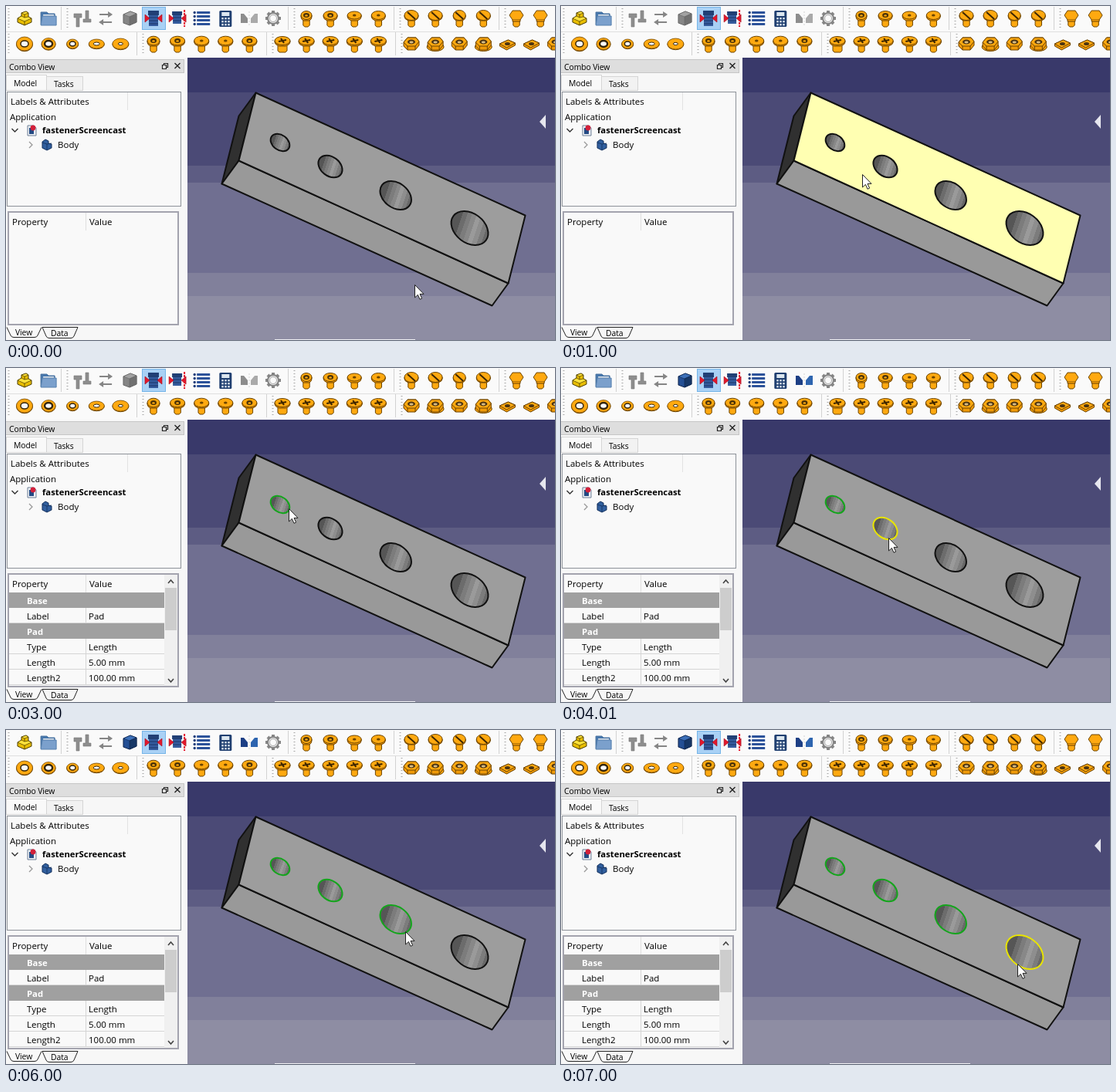
An HTML page that plays this animation: 711x433 px, repeating every 8000 ms.

```html
<!DOCTYPE html>
<html lang="en">
<head>
<meta charset="utf-8">
<title>Selecting holes in a CAD model</title>
<style>
html, body { margin: 0; width: 100%; height: 100%; overflow: hidden; background: #fafafa; }
svg { display: block; width: 711px; height: 433px; }
text { font: 11.5px "Open Sans", "Noto Sans", sans-serif; fill: #000; }
text.small { font-size: 10.4px; letter-spacing: -.1px; }
text.bold { font-size: 11.3px; font-weight: 700; }
</style>
</head>
<body>
<svg id="stage" viewBox="0 0 711 433" xmlns="http://www.w3.org/2000/svg"></svg>
<script>
const LOOP = 8000;
const ORANGE = '#ffa910', SHADE = '#f09a08', BROWN = '#6b4300', BLACK = '#111', PAPER = '#f9f9f9';
const YELLOW = '#e8e400', GREEN = '#14a51c';

const rect = (x, y, w, h, fill, extra = '') =>
  `<rect x="${x}" y="${y}" width="${w}" height="${h}" fill="${fill}" ${extra}/>`;
const path = (d, fill = 'none', stroke = 'none', width = 1, extra = '') =>
  `<path d="${d}" fill="${fill}" stroke="${stroke}" stroke-width="${width}" ${extra}/>`;
const oval = (x, y, rx, ry, fill, stroke = 'none', width = 1) =>
  `<ellipse cx="${x}" cy="${y}" rx="${rx}" ry="${ry}" fill="${fill}" stroke="${stroke}" stroke-width="${width}"/>`;
const text = (x, y, s, cls = '', fill = '#000') =>
  `<text x="${x}" y="${y}" class="${cls}" style="fill:${fill}">${s}</text>`;
const at = (x, y, s) => `<g transform="translate(${x} ${y})">${s}</g>`;
const times = (n, fn) => Array.from({ length: n }, (_, i) => fn(i)).join('');

// Toolbar icons, each drawn around its own centre
const grip = (x, y) => path(`M${x - 7.5} ${y - 15}v30`, 'none', '#d2d2d2') +
  path(`M${x + .5} ${y - 13}v27`, 'none', '#a8a8a8', 2, 'stroke-dasharray="1 3"');

const cube = (top, left, right, edge) =>
  path('M-8-5L1-9L9-6V5L0 9L-8 6Z', left, edge) +
  path('M-8-5L1-9L9-6L0-2Z', top, edge, .6) + path('M0-2L9-6V5L0 9Z', right, edge, .6);

const brick = path('M-9 0L-4-3V-7L2-9L5-7V-2L9 0V5L0 9L-9 5Z', '#e8bd00', '#4a3c00') +
  path('M-9 0L-4-3L0-1L5-2L9 0L0 4Z', '#ffe23c', '#4a3c00', .7) +
  path('M-4-7L2-9L5-7L0-5Z', '#ffe23c', '#4a3c00', .7) +
  path('M0 4V9M0-5V-1', 'none', '#4a3c00', .8);

const folder = path('M-10-8H-2L0-6H8V8H-10Z', '#4878ad', '#456f9d') +
  rect(-7, -5, 14, 3, '#e4e8ed') + path('M-8-3H10V9H-10Z', '#7ba0cc', '#5680ae');

const bolts = path('M-10-6H0V-1H-3V11H-7V-1H-10ZM5-10H9V1H12V5H2V1H5Z', '#8e8e8e', '#777', .6);
const swap = path('M-8-6H3V-9L9-5L3-1V-4H-8ZM8 4H-3V1L-9 5L-3 9V6H8Z', '#858585');

const redArrows = path('M-11-5L-5 0L-11 5ZM11-5L5 0L11 5Z', '#e3172c', '#9a0c1c', .6);
const fit = rect(-7, -10, 14, 6, '#213f75') + rect(-6, -4, 12, 14, '#345b9d') +
  path('M-6-1H6M-6 3H6M-6 7H6', 'none', '#1b3568') + redArrows;
const gauge = rect(-7, -9, 13, 5, '#213f75') + rect(-6, -4, 11, 11, '#345b9d') +
  path('M-6-1H5M-6 3H5', 'none', '#1b3568') + redArrows +
  path('M9-11V11', 'none', '#e3172c', 2, 'stroke-dasharray="3 1"');

const list = times(4, i => oval(-9, -7.5 + i * 5, 1.7, 1.7, '#203f7c') +
  rect(-6, -9 + i * 5, 17, 3, '#2c529a'));
const calculator = rect(-8, -10, 16, 21, '#203f70', 'rx="1.5"') + rect(-5, -8, 10, 5, '#dbe6ef') +
  times(9, i => rect(-5 + i % 3 * 4, -1 + Math.floor(i / 3) * 4, 2.4, 2.4, '#dbe6ef'));
const mirror = (left, right) => path('M-11-6H-7L-2 0V6H-11Z', left) +
  path('M11-6H7L2 0V6H11Z', right) + path('M0-9V10', 'none', '#d4d4d4', 1, 'stroke-dasharray="2 2"');
const gear = path('M0-10V10M-10 0H10M-7-7L7 7M-7 7L7-7', 'none', '#858585', 4) +
  oval(0, 0, 7, 7, '#eee', '#858585', 2) + oval(0, 0, 4.5, 4.5, '#fafafa', '#aaa');

const shank = (w = 4.2) => path(`M${-w} 1V9L${-w + 2} 11H${w - 2}L${w} 9V1Z`, ORANGE, BROWN);
const marks = {
  hex: oval(0, -4, 4, 3, '#4a3208') + oval(0, -3.6, 1.8, 1.2, ORANGE),
  dot: oval(0, -4, 2.3, 1.6, '#6b4400'),
  cross: path('M-5-3L5-5M-2-7L2-1', 'none', '#3d2600', 2.2),
  slot: path('M-5-8L5 1', 'none', '#3d2600', 2)
};
const screw = (mark, rx, ry, width) => shank(width) +
  path(`M${-rx}-4V-2Q${-rx} 1-4 3H4Q${rx} 1 ${rx}-2V-4Z`, SHADE, BROWN) +
  oval(0, -4, rx, ry, ORANGE, BROWN) + marks[mark];
const hexBolt = shank() + path('M-9-4L-5-10H5L9-4L5 2H-5Z', ORANGE, BROWN) +
  path('M-5 2V4H5V2', SHADE, BROWN);
const washer = (rx, ry, hx, hy, edge) =>
  oval(0, .7, rx, ry, SHADE, BROWN) + oval(0, 0, rx, ry, ORANGE, BROWN, .7) +
  oval(0, 0, hx, hy, '#fafafa', '#33250c', edge);
const hexNut = flange => (flange ? oval(0, 4, 11, 5.5, ORANGE, BROWN) : '') +
  path('M-10-2L-5-8H6L10-3V2L5 8H-5L-10 3Z', SHADE, BROWN) +
  path('M-10-2L-5-8H6L10-3L5 3H-5Z', ORANGE, BROWN) +
  path('M-5 3V8M5 3V8', 'none', BROWN) + oval(0, -2.5, 5, 3, '#4c3512') + oval(0, -2, 2.6, 1.4, '#d9bd84');
const squareNut = path('M-10 0L1-5L10-1V2L-1 8L-10 3Z', SHADE, BROWN) +
  path('M-10 0L1-5L10-1L-1 5Z', ORANGE, BROWN) + oval(0, 0, 3.5, 2, '#4c3512');

function toolbar() {
  const row = (y, start, icons) => icons.map((icon, i) => at(start + i * 31.1, y, icon)).join('');
  return rect(0, 0, 711, 67, '#fafafa') + rect(0, 33, 711, 1, '#dedede') +
    rect(176.5, 1.5, 30, 29, '#a9d1f5', 'stroke="#75b5e8"') +
    [3, 79, 373, 510, 646].map(x => grip(x, 16)).join('') +
    [3, 177, 345, 512].map(x => grip(x, 49)).join('') +
    row(16, 24, [brick, folder]) + row(16, 98, [bolts, swap]) +
    `<g id="idle">${at(160, 16, cube('#a2a2a2', '#858585', '#707070', '#666'))}${at(315, 16, mirror('#8d8d8d', '#aaa'))}</g>` +
    `<g id="ready">${at(160, 16, cube('#3d70b8', '#244f94', '#173766', '#0d234b'))}${at(315, 16, mirror('#1d3f85', '#2e65b0'))}</g>` +
    row(16, 191, [fit, gauge, list, calculator]) + at(346, 16, gear) +
    row(16, 389, [screw('hex', 7, 5.5), screw('hex', 9, 5.5), screw('dot', 9, 5), screw('dot', 9, 5.5)]) +
    row(16, 525, [9, 9, 8, 9].map(rx => screw('slot', rx, 6.5))) +
    row(16, 661, [hexBolt, hexBolt]) +
    row(49, 24, [washer(10.5, 9, 5, 4, 1.5), washer(9, 7.5, 5, 4, 2.4), washer(7.5, 6, 3.8, 3, 1.5),
      washer(10, 6, 4, 2, 1), washer(10.5, 7, 3, 1.6, 1)]) +
    row(49, 191, ['hex', 'hex', 'dot', 'dot', 'hex'].map((mark, i) => screw(mark, i ? 9.5 : 8, 5.8))) +
    row(49, 358, [6, 4, 4, 4, 4].map(width => screw('cross', 10, 5.5, width))) +
    row(49, 525, [hexNut(false), hexNut(true), hexNut(false), hexNut(true), squareNut, squareNut, hexNut(false)]);
}

function properties() {
  const group = (y, name) => rect(4, y, 201, 20, '#a0a0a0') + text(27, y + 15, name, 'bold', '#fff');
  const item = (y, name, value) => text(27, y + 15, name) + text(107, y + 15, value) +
    path(`M4 ${y + 19.5}H205M103.5 ${y}v20`, 'none', '#d5d5d5');
  return '<g id="properties">' +
    group(291, 'Base') + item(311, 'Label', 'Pad') + group(331, 'Pad') +
    item(351, 'Type', 'Length') + item(371, 'Length', '5.00 mm') + item(391, 'Length2', '100.00 mm') +
    rect(205, 268, 17, 144, '#f0f0f0') + rect(206, 285, 15, 55, '#cdcdcd') +
    path('M210 279l3.5-4l3.5 4M210 403l3.5 4l3.5-4', 'none', '#444', 1.6) + '</g>';
}

function sidePanel() {
  return rect(0, 67, 235, 366, '#f7f7f7') +
    rect(-.5, 69.5, 231, 17, '#dedede', 'stroke="#c6c6c6"') +
    text(4, 83, 'Combo View', 'small') +
    path('M202.5 76.5h5v5h-5zM204.5 76V74.5h5v5H208', 'none', '#222', 1.2) +
    path('M218.5 74l7 7M225.5 74l-7 7', 'none', '#222', 1.4) +
    rect(52.5, 91.5, 47, 18, '#f2f2f2', 'stroke="#d5d5d5"') + rect(.5, 89.5, 52, 20, PAPER, 'stroke="#d5d5d5"') +
    text(10, 104, 'Model', 'small') + text(62, 105, 'Tasks', 'small') +
    rect(1.5, 111.5, 225, 148, PAPER, 'stroke="#8d9299"') +
    path('M157.5 112v23', 'none', '#e2e2e2') +
    text(6, 128, 'Labels &amp; Attributes') + text(5, 148, 'Application') +
    path('M7.5 159l4 4l4-4', 'none', '#333', 1.4) + path('M30 176l4 4l-4 4', 'none', '#999', 1.3) +
    path('M28 155h8l3 3v10H28z', '#eef1f5', '#6c7f96') +
    rect(30, 158, 6, 8, '#244a83') + oval(35, 158, 3.4, 3.4, '#d3203a') +
    text(47, 165, 'fastenerScreencast', 'bold') +
    path('M47 176l4-3l4 2v3l4 1v5l-6 3l-6-3z', '#315f9e', '#122f5b') +
    path('M47 177l6 2l6-1M53 179v7', 'none', '#122f5b', .8) + text(67, 184, 'Body') +
    rect(3, 267, 220, 146, PAPER, 'stroke="#a3a3ae" stroke-width="2"') + path('M103.5 268v23', 'none', '#dedede') +
    text(8, 284, 'Property') + text(108, 284, 'Value') + properties() +
    path('M47 416.5H93L88 428Q87 430.5 84 430.5H56Q53 430.5 52 428Z', '#f7f7f7', '#222') +
    path('M1 416.5L6 427Q7 429.5 10 429.5H37Q40 429.5 41 427L46 416.5', PAPER, '#222') +
    text(12, 427, 'View', 'small') + text(58, 428, 'Data', 'small');
}

const holes = [[354.5, 176.5, .515], [419.5, 207.5, .65], [504.2, 245, .845], [600, 287.5, 1]];
const shades = ['#565656', '#6c6c6c', '#7c7c7c', '#888', '#9a9a9a', '#8e8e8e', '#7c7c7c', '#686868', '#4c4c4c'];

function viewport() {
  const bands = [[67, '#39396a'], [112, '#4b4a76'], [207, '#5d5c83'], [229, '#706f91'], [346, '#81809b'], [376, '#8e8da3']];
  const stops = shades.map((c, i) =>
    `<stop offset="${i / shades.length}" stop-color="${c}"/><stop offset="${(i + 1) / shades.length}" stop-color="${c}"/>`).join('');
  const side = (d, fill, id = '') => path(d, fill, BLACK, 2, `stroke-linejoin="round" ${id}`);
  const block =
    side('M323 112L301 200L279 230L301 142Z', '#303030') +
    side('M301 200L650 359L629 388L279 230Z', '#999') +
    side('M323 112L672 271L650 359L301 200Z', '#9d9d9d', 'id="face"') +
    holes.map(([x, y, s]) => `<ellipse class="hole" rx="${26.3 * s}" ry="${19 * s}" ` +
      `transform="translate(${x} ${y}) rotate(37)" fill="url(#bore)" stroke-width="2"/>`).join('');
  return `<defs><linearGradient id="bore" y1=".12" y2="-.12">${stops}</linearGradient></defs>` +
    bands.map(([y, c]) => rect(235, y, 476, 433 - y, c)).join('') +
    path('M699 141v18l-8-9z', '#e6e6ee') + rect(348, 432, 182, 1, '#eeeef2') +
    at(.5, .5, block) +
    path('M.5.5V17L4.4 13.4L7 19.3L9.6 18.1L7 12.4H12Z', '#fff', '#222', 1, 'id="cursor"');
}

const stage = document.getElementById('stage');
stage.innerHTML = viewport() + sidePanel() + toolbar();
const get = id => document.getElementById(id);
const rings = [...document.querySelectorAll('.hole')];

// picked: holes already selected; hover: hole under the pointer
const steps = [
  { from: 0, cursor: [529, 361], picked: 0 },
  { from: 1000, cursor: [390, 218], picked: 0, faceLit: true },
  { from: 2010, cursor: [366, 182], picked: 0, hover: 0 },
  { from: 3000, cursor: [366, 182], picked: 1, details: true },
  { from: 4010, cursor: [424, 220], picked: 1, hover: 1, details: true, ready: true },
  { from: 5010, cursor: [473, 255], picked: 2, faceLit: true, details: true, ready: true },
  { from: 6000, cursor: [517, 261], picked: 3, details: true, ready: true },
  { from: 7000, cursor: [591, 303], picked: 3, hover: 3, details: true, ready: true }
];

const show = (id, on) => get(id).setAttribute('visibility', on ? 'visible' : 'hidden');

function update(ms) {
  const step = steps.filter(s => s.from <= ms).pop();
  get('cursor').setAttribute('transform', `translate(${step.cursor})`);
  get('face').setAttribute('fill', step.faceLit ? '#ffffb2' : '#9d9d9d');
  rings.forEach((ring, i) =>
    ring.setAttribute('stroke', i === step.hover ? YELLOW : i < step.picked ? GREEN : BLACK));
  show('properties', step.details);
  show('ready', step.ready);
  show('idle', !step.ready);
}

function tick() {
  update(performance.now() % LOOP);
  requestAnimationFrame(tick);
}
tick();
</script>
</body>
</html>
```
